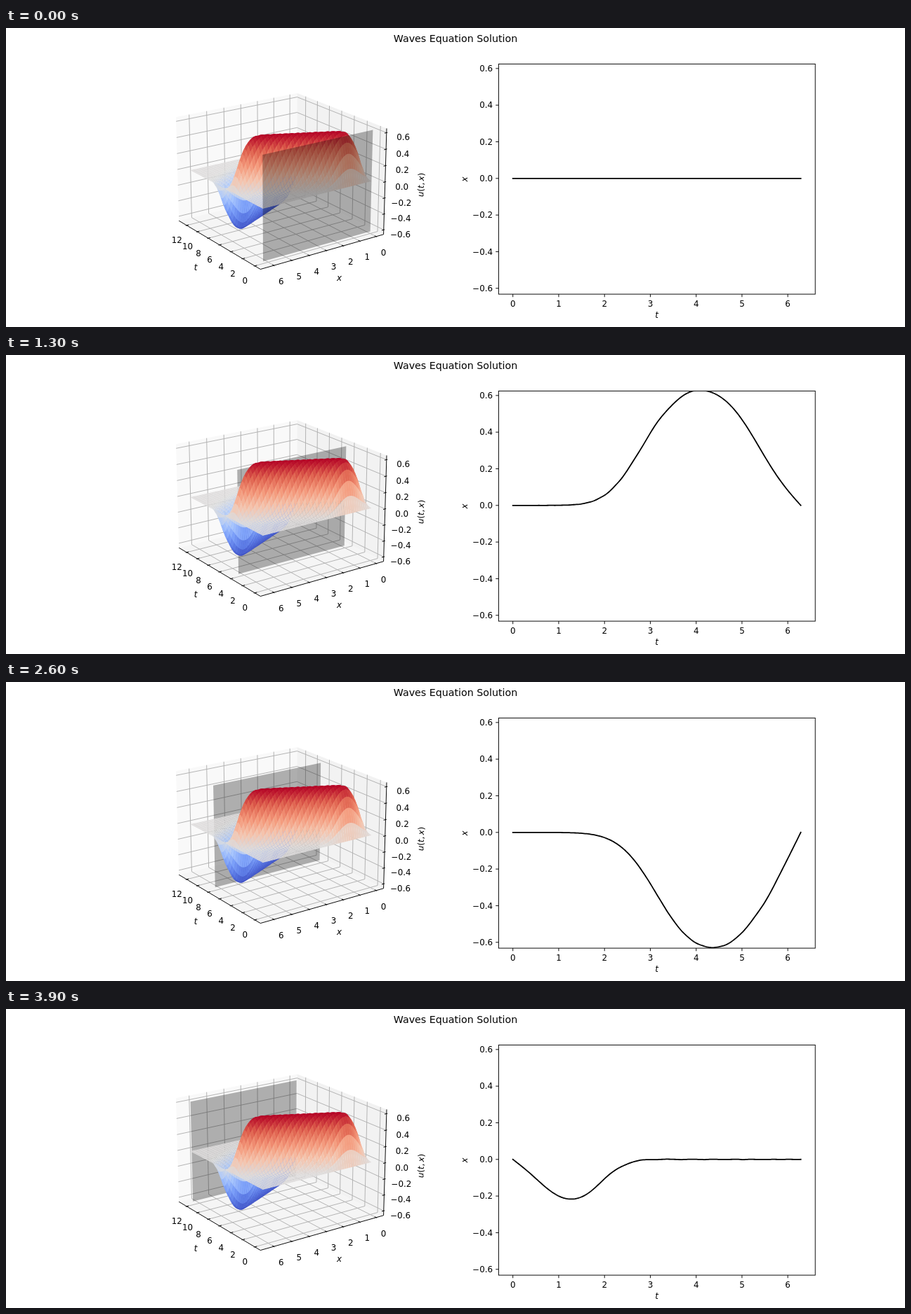
These frames come from a looping animation (1280 px wide and 427 px high, 4 s). An HTML page with a canvas:

```html
<!DOCTYPE html>
<html lang="en">
<head>
<meta charset="utf-8">
<title>Waves Equation Solution</title>
<style>
html, body { margin: 0; width: 100%; height: 100%; overflow: hidden; background: #fff; }
canvas { display: block; width: 1280px; height: 427px; }
</style>
</head>
<body>
<canvas id="stage" width="1280" height="427"></canvas>
<script>
const ctx = document.getElementById("stage").getContext("2d");
const FRAMES = 40, FRAME_MS = 100;
const X_MAX = 2 * Math.PI, T_MAX = 4 * Math.PI;
const SAMPLES = 199, DT = T_MAX / SAMPLES, STEP = 5 * DT;
const U_MIN = -0.632, U_MAX = 0.625;
const THIN = 0.95;
const range = (n, f) => Array.from({ length: n }, (_, i) => f(i));

// Fixed-end string struck by a bump of velocity, as a sum of sine modes.
// The frequencies carry the slight lag of an implicit scheme with time step DT.
const CELLS = 100, H = X_MAX / CELLS;
const strike = x => 0.832 * Math.exp(-1.3 * (x - 1.27) ** 2);
const modes = range(50, m => {
  const k = (m + 1) / 2;
  const turn = Math.acos(1 / (1 + (k * DT) ** 2 / 2));
  let sum = 0;
  for (let j = 1; j < CELLS; j++) sum += strike(j * H) * Math.sin(k * j * H);
  return { k, w: turn / DT, amp: 2 * sum / CELLS * DT / Math.sin(turn) };
});
const wave = (t, x) =>
  modes.reduce((s, { k, w, amp }) => s + amp * Math.sin(w * t) * Math.sin(k * x), 0);

// Perspective camera; scene coordinates are centred on the box.
const rad = Math.PI / 180, AZ = 145 * rad, EL = 20 * rad;
const WALL = 0.5714, ROOF = 0.4286, INSET = 0.4987;
const boxT = t => INSET * (2 * t / T_MAX - 1);
const boxX = x => INSET * (2 * x / X_MAX - 1);
const boxU = u => 0.6547 * (u - (U_MIN + U_MAX) / 2);

function project([a, b, c]) {
  const toward = a * Math.cos(AZ) + b * Math.sin(AZ);
  const side = -a * Math.sin(AZ) + b * Math.cos(AZ);
  const up = c * Math.cos(EL) - toward * Math.sin(EL);
  const depth = toward * Math.cos(EL) + c * Math.sin(EL);
  const s = 1857 / (10 - depth);
  return [390 + side * s, 211.2 - up * s, depth];
}

const RAMP = [
  [59, 76, 192], [89, 119, 227], [123, 159, 249], [170, 199, 253], [221, 221, 221],
  [245, 196, 173], [244, 152, 122], [222, 96, 77], [180, 4, 38]
];
function heat(u) {
  const v = Math.min(Math.max((u - U_MIN) / (U_MAX - U_MIN), 0), 1) * 8;
  const i = Math.min(Math.floor(v), 7);
  return `rgb(${RAMP[i].map((c, j) => Math.round(c + (RAMP[i + 1][j] - c) * (v - i)))})`;
}

function trace(points) {
  ctx.beginPath();
  points.forEach(p => ctx.lineTo(p[0], p[1]));
}
function fill(points, color) {
  trace(points);
  ctx.closePath();
  ctx.fillStyle = color;
  ctx.fill();
}
function stroke(points, color = "#000", width = THIN) {
  trace(points);
  ctx.strokeStyle = color;
  ctx.lineWidth = width;
  ctx.stroke();
}
const fill3 = (points, color) => fill(points.map(project), color);
const stroke3 = (points, color) => stroke(points.map(project), color);

// y is the middle of the digits
function label(text, x, y, { align = "center", size = 11.85, italic = false } = {}) {
  ctx.font = `${italic ? "italic " : ""}${size}px "DejaVu Sans", sans-serif`;
  ctx.fillStyle = "#000";
  ctx.textAlign = align;
  ctx.fillText(text, x, y + size * 0.365);
}
function turned(x, y, angle, draw) {
  ctx.save();
  ctx.translate(x, y);
  ctx.rotate(angle);
  draw();
  ctx.restore();
}
const signed = v => (v < -0.01 ? "\u2212" : "") + Math.abs(v).toFixed(1);

const tTicks = range(7, i => 2 * i);
const xTicks = range(7, i => i);
const uTicks = range(7, i => (i - 3) / 5);

// Every fourth sample in both directions, plus the last one.
const GRID = 50;
const part = i => Math.min(4 * i, SAMPLES) / SAMPLES;
const mesh = range(GRID + 1, i => range(GRID + 1, j => {
  const t = T_MAX * part(i), x = X_MAX * part(j), u = wave(t, x);
  return { u, p: project([boxT(t), boxX(x), boxU(u)]) };
}));
const quads = [];
for (let i = 0; i < GRID; i++) {
  for (let j = 0; j < GRID; j++) {
    const v = [mesh[i][j], mesh[i][j + 1], mesh[i + 1][j + 1], mesh[i + 1][j]];
    const mean = f => v.reduce((s, q) => s + f(q), 0) / 4;
    quads.push({ points: v.map(q => q.p), color: heat(mean(q => q.u)), depth: mean(q => q.p[2]) });
  }
}
quads.sort((a, b) => a.depth - b.depth);

function drawBox() {
  const W = WALL, R = ROOF, grid = "#b0b0b0";
  fill3([[W, -W, -R], [W, W, -R], [W, W, R], [W, -W, R]], "#f9f9f9");
  fill3([[-W, -W, -R], [W, -W, -R], [W, -W, R], [-W, -W, R]], "#f2f2f2");
  fill3([[-W, -W, -R], [W, -W, -R], [W, W, -R], [-W, W, -R]], "#f5f5f5");
  for (const t of tTicks.map(boxT)) stroke3([[t, W, -R], [t, -W, -R], [t, -W, R]], grid);
  for (const x of xTicks.map(boxX)) stroke3([[-W, x, -R], [W, x, -R], [W, x, R]], grid);
  for (const u of uTicks.map(boxU)) stroke3([[W, W, u], [W, -W, u], [-W, -W, u]], grid);

  stroke3([[-W, W, -R], [W, W, -R]]);
  stroke3([[-W, W, -R], [-W, -W, -R]]);
  stroke3([[-W, -W, -R], [-W, -W, R]]);

  const out = W + 0.0095, inn = W - 0.019;
  const tick = (from, to, edge, text, dx, dy) => {
    stroke3([from, to]);
    const [x, y] = project(edge);
    label(text, x + dx, y + dy);
  };
  for (const v of tTicks) {
    const t = boxT(v);
    tick([t, inn, -R], [t, out, -R], [t, W, -R], String(v), -14, 21);
  }
  for (const v of xTicks) {
    const x = boxX(v);
    tick([-inn, x, -R], [-out, x, -R], [-W, x, -R], String(v), 10.5, 22.7);
  }
  for (const v of uTicks) {
    const u = boxU(v);
    tick([-W, -inn, u], [-W, -out, u], [-W, -W, u], signed(v), 23.8, 6.4);
  }
  label("t", 270, 342, { italic: true });
  label("x", 474.5, 357, { italic: true });
  turned(590.5, 224, -88.5 * rad, () => {
    let x = -17.2;
    for (const glyph of "u(t,x)") {
      label(glyph, x, 0, { align: "left", italic: /[utx]/.test(glyph) });
      x += ctx.measureText(glyph).width + (glyph === "," ? 2.3 : 0);
    }
  });
}

function drawSurface() {
  for (const q of quads) fill(q.points, q.color);
}
function drawPlane(t) {
  const a = boxT(t), lo = boxU(U_MIN), hi = boxU(U_MAX);
  fill3([[a, -INSET, lo], [a, INSET, lo], [a, INSET, hi], [a, -INSET, hi]], "rgba(0,0,0,0.3)");
}

const plot = { left: 701.4, right: 1152.2, top: 51.4, bottom: 380.1 };
const plotX = x => 721.7 + 65.24 * x;
const plotY = u => 214.8 - 261.6 * u;

function drawPlot(t) {
  const { left, right, top, bottom } = plot;
  ctx.save();
  ctx.beginPath();
  ctx.rect(left, top, right - left, bottom - top);
  ctx.clip();
  ctx.lineJoin = "round";
  ctx.lineCap = "square";
  stroke(range(SAMPLES + 1, i => {
    const x = X_MAX * i / SAMPLES;
    return [plotX(x), plotY(wave(t, x))];
  }), "#000", 1.78);
  ctx.restore();

  ctx.strokeStyle = "#000";
  ctx.lineWidth = THIN;
  ctx.strokeRect(left, top, right - left, bottom - top);
  for (const v of xTicks) {
    const x = plotX(v);
    stroke([[x, bottom], [x, bottom + 4.15]]);
    label(String(v), x, 394);
  }
  for (const v of uTicks) {
    const y = plotY(v);
    stroke([[left - 4.15, y], [left, y]]);
    label(signed(v), 693, y, { align: "right" });
  }
  label("t", 926.5, 410, { italic: true });
  turned(652.5, 216, -Math.PI / 2, () => label("x", 0, 0, { italic: true }));
}

function draw(index) {
  const t = index * STEP;
  ctx.fillStyle = "#fff";
  ctx.fillRect(0, 0, 1280, 427);
  label("Waves Equation Solution", 640, 15.3, { size: 14.22 });
  drawBox();
  // The whole plane jumps behind the surface once its nearest corner is farther away.
  const planeInFront = index < 8;
  if (!planeInFront) drawPlane(t);
  drawSurface();
  if (planeInFront) drawPlane(t);
  drawPlot(t);
}

let shown = -1;
function tick() {
  const index = Math.floor(performance.now() / FRAME_MS) % FRAMES;
  if (index !== shown) draw(shown = index);
  requestAnimationFrame(tick);
}
tick();
</script>
</body>
</html>
```
